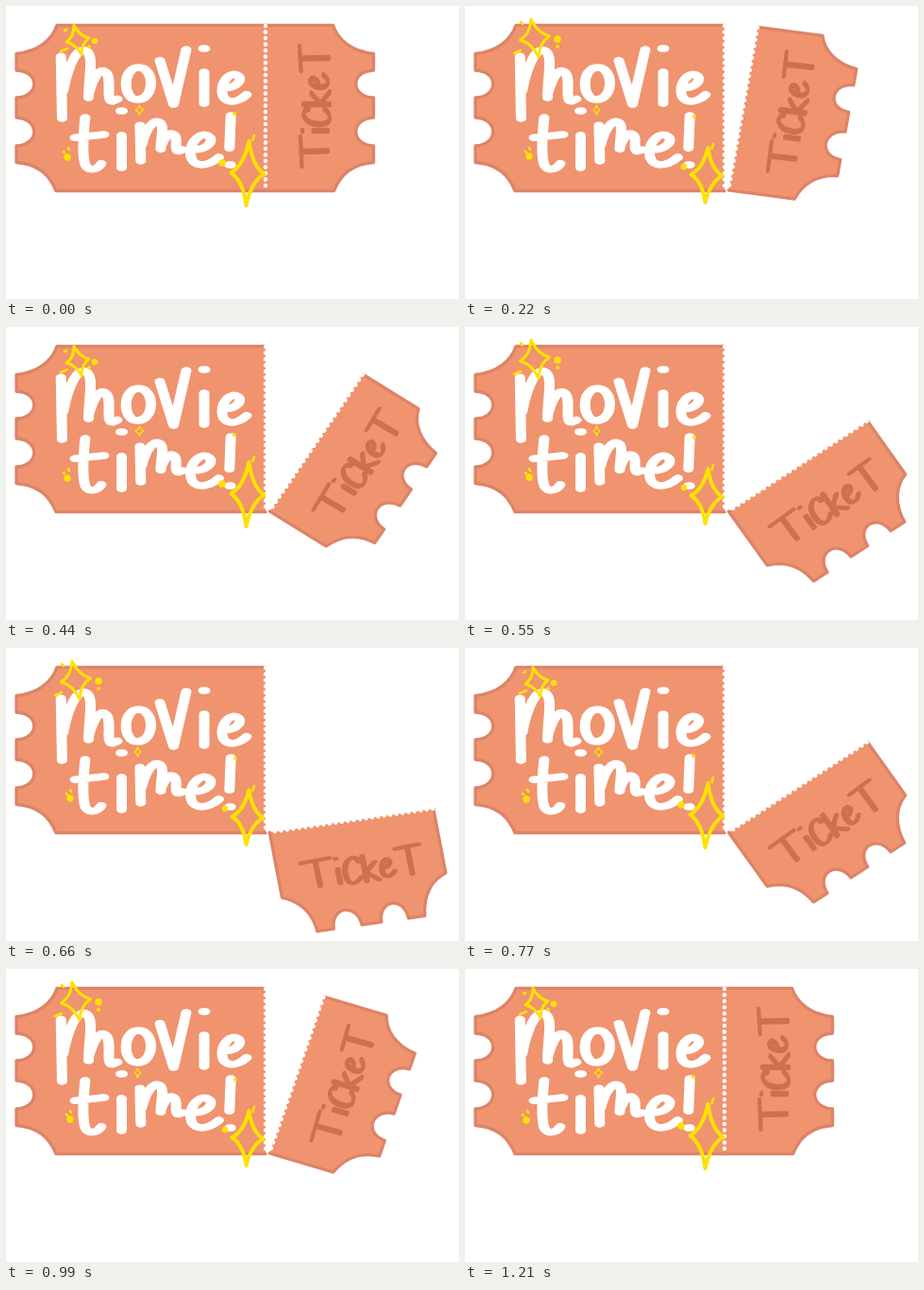
These frames come from a looping animation (480x310 px, 1320 ms). An HTML page with a canvas:

```html
<!DOCTYPE html>
<html lang="en">
<head>
<meta charset="utf-8">
<title>Movie time ticket</title>
<style>
  html, body { margin: 0; width: 100%; height: 100%; overflow: hidden; background: #fff; }
  canvas { display: block; }
</style>
</head>
<body>
<canvas id="stage" width="480" height="310" role="img" aria-label="movie time! Ticket"></canvas>
<script>
const ctx = document.getElementById('stage').getContext('2d');
const STEP = 110, STEPS = 12;
const FILL = '#f0936f', EDGE = '#dc8469', INK = '#cf6f50', YELLOW = '#ffe100';
const SEAM = 275, TOP = 20.3, FOOT = 195.7;
const NIB = 0.68;                               // pen height relative to its width
const SWING = [0, 8.8, 17.8, 33, 55.7, 80.5];   // stub angle in degrees
const rad = d => d * Math.PI / 180;

// Brush letters in a unit box
const GLYPHS = {
  m: 'M.02 .1 L.04 1 M.06 .6 C.15 .2 .32 -.05 .46 .02 C.6 .1 .5 .4 .5 .7 M.5 .65 C.58 .4 .7 .25 .8 .33 C.92 .42 .78 .76 .92 .75 L1 .72',
  o: 'M.5 0 C-.15 0 -.15 1 .45 1 C1.15 1 1.15 0 .5 0 Z',
  V: 'M0 .2 L.52 1 L1 0',
  i: 'M.5 .43 V1 M.45 0 H.55',
  e: 'M.1 .5 C.6 .5 .85 .2 .65 .06 C.4 -.12 0 .2 0 .6 C0 1.1 .6 1.1 1 .75',
  t: 'M0 .4 L1 .34 M.35 0 C.28 .4 .25 .8 .36 .95 C.5 1.1 .8 1.02 .9 .92',
  '!': 'M.6 0 L.4 .66 M.4 1 H.6',
  T: 'M0 .05 L1 0 M.5 .02 L.52 1',
  C: 'M1 .2 C.9 -.15 0 0 0 .6 C0 1.15 .7 1.05 1 .8',
  k: 'M0 0 V1 M.9 .3 L.05 .65 L1 1'
};

// Sets a word from x on; each box is [width, top, bottom]
function word(text, x, gap, boxes) {
  const path = new Path2D();
  boxes.forEach(([w, top, bottom], i) => {
    const box = new DOMMatrix([w, 0, 0, (bottom - top) / NIB, x, top / NIB]);
    path.addPath(new Path2D(GLYPHS[text[i]]), box);
    x += w + gap;
  });
  return path;
}

const title = new Path2D();
title.addPath(word('moVie', 57, 9, [[61, 46, 119], [27, 65, 99], [28, 46, 104], [20, 45, 103], [26, 72, 101]]));
title.addPath(word('time!', 73, 8.5, [[31, 118, 171], [20, 111, 171], [46, 122, 164], [30, 136, 168], [7, 116, 168]]));
const label = word('TiCkeT', 1, 5, [[30, 4, 33], [4, 6, 33], [16, 7, 35], [13, 7, 35], [13, 14, 33], [25, 3, 34]]);

// Ticket part from the seam to a notched side at x; d points inwards
function outline(x, d) {
  const bite = (y, h) => `L${x} ${y} C${x + 25 * d} ${y + 1} ${x + 25 * d} ${y + h - 1} ${x} ${y + h}`;
  return new Path2D(`M${SEAM} ${TOP} H${x + 43 * d}
    C${x + 38 * d} 36 ${x + 23 * d} 48 ${x} 50.5 ${bite(68, 29)} ${bite(118, 30)} L${x} 165.5
    C${x + 23 * d} 167 ${x + 36 * d} 180 ${x + 42 * d} ${FOOT} H${SEAM}`);
}
const body = outline(11, 1), stub = outline(389.5, -1);

function brush(path, width, color) {
  ctx.save();
  ctx.scale(1, NIB);
  ctx.strokeStyle = color;
  ctx.lineWidth = width;
  ctx.stroke(path);
  ctx.restore();
}

function dot(x, y, r) {
  ctx.beginPath();
  ctx.arc(x, y, r, 0, Math.PI * 2);
  ctx.fill();
}

function card(path) {
  ctx.fillStyle = FILL;
  ctx.fill(path);
  ctx.strokeStyle = EDGE;
  ctx.lineWidth = 3.3;
  ctx.stroke(path);
  ctx.fillStyle = '#fff';
  for (let y = 21; y < FOOT; y += 6.5) dot(SEAM, y, 2.2);
}

function drawStub(angle) {
  ctx.save();
  if (angle) {
    // The torn stub is slightly skewed and narrower
    const u = rad(angle - 1.3), v = rad(angle + 1.3);
    ctx.transform(0.97 * Math.cos(u), 0.97 * Math.sin(u), -Math.sin(v), Math.cos(v), 279.3, 195);
    ctx.translate(-SEAM, -FOOT);
  }
  card(stub);
  ctx.translate(308, 170);
  ctx.rotate(-Math.PI / 2);
  brush(label, 6.3, INK);
  ctx.restore();
}

function star(x, y, rx, ry, width, lean = 0) {
  const tips = [[x - lean, y - ry], [x + rx, y - lean / 2], [x + lean, y + ry], [x - rx, y + lean / 2]];
  ctx.lineWidth = width;
  ctx.beginPath();
  ctx.moveTo(...tips[0]);
  tips.forEach(([px, py], i) => {
    const [qx, qy] = tips[(i + 1) % 4];
    ctx.quadraticCurveTo((px + qx + 2 * x) / 4, (py + qy + 2 * y) / 4, qx, qy);
  });
  ctx.closePath();
  ctx.stroke();
}

function ray(x, y, dx, dy) {
  ctx.lineWidth = 2.6;
  ctx.beginPath();
  ctx.moveTo(x, y);
  ctx.lineTo(x + dx, y + dy);
  ctx.stroke();
}

// k is 0 or 1: the two twinkle states
function drawSparkles(k) {
  ctx.strokeStyle = ctx.fillStyle = YELLOW;
  star(76 - 2 * k, 36 - 2 * k, 12 + 3.5 * k, 15.5 + 4.5 * k, 3, 4);
  dot(94 + 4 * k, 37 - 2 * k, 3.3 + k / 2);
  dot(88 + 10 * k, 43, 2);
  ray(58 - 6 * k, 48 + 2 * k, 7, -3);
  ray(62 - 3 * k, 26 - 9 * k, 2, 3 * k - 1);

  star(256, 177 + 2 * k, 17.5 - k, 34 - 5 * k, 4, -1.5);
  dot(229 + 3 * k, 166 + 4 * k, 3.8 - k / 2);
  ray(263, 137 + 9 * k, -1.5, 5);

  star(141.5 - 2 * k, 110, 4.5 - k, 5, 1.3);
  dot(242 + k, 114 + 3 * k, 2);

  dot(65 + 3 * k, 160 - k, 3.7);
  ray(61 + 3 * k, 154, 1, 1);
  ray(66 + 2 * k, 150, 1, 2);
}

function draw(n) {
  ctx.fillStyle = '#fff';
  ctx.fillRect(0, 0, 480, 310);
  ctx.lineCap = ctx.lineJoin = 'round';
  card(body);
  // Opens up to the middle of the loop, then closes the same way
  drawStub(SWING[Math.max(0, 5 - Math.abs(n - 6))]);
  brush(title, 11, '#fff');
  drawSparkles((n + 1) % 4 < 2 ? 0 : 1);
}

const start = performance.now();
function tick() {
  const t = Math.max(0, performance.now() - start);
  draw(Math.floor(t / STEP) % STEPS);
  requestAnimationFrame(tick);
}
tick();
</script>
</body>
</html>
```
